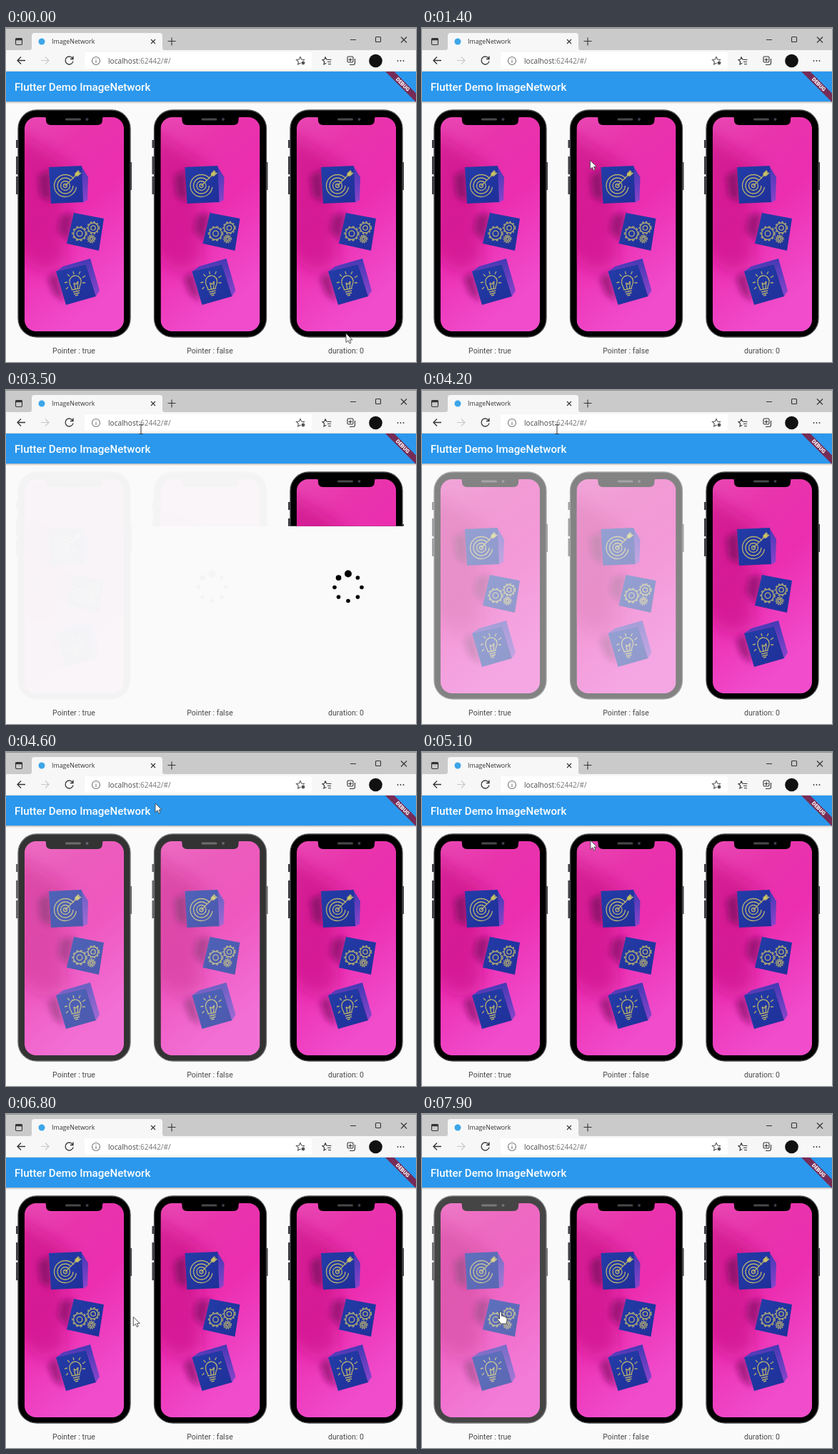
An HTML page for the animation above (8 s loop, 574 px wide and 468 px high).

```html
<!DOCTYPE html>
<html lang="en">
<head>
<meta charset="utf-8">
<title>ImageNetwork</title>
<style>
  html, body { margin: 0; width: 100%; height: 100%; overflow: hidden; background: #fdfdfd; }
  svg { display: block; }
  .ui { font-family: "Open Sans", sans-serif; }
  .app { font-family: Roboto, sans-serif; }
  .line { fill: none; stroke: #333; stroke-width: 1.1; }
  .gold { fill: none; stroke: #b3ae70; stroke-width: 1.3; }
</style>
</head>
<body>
<svg width="574" height="468" viewBox="0 0 574 468">
  <defs>
    <linearGradient id="pink" x1="0" y1="0" x2=".4" y2="1">
      <stop offset="0" stop-color="#ea48b4"/>
      <stop offset=".25" stop-color="#e835ac"/>
      <stop offset=".55" stop-color="#ec2db0"/>
      <stop offset="1" stop-color="#f04ccc"/>
    </linearGradient>
    <linearGradient id="face" x1="0" y1="0" x2="1" y2="1">
      <stop offset="0" stop-color="#233da8"/>
      <stop offset="1" stop-color="#1f2f98"/>
    </linearGradient>
    <linearGradient id="side" x1="0" y1="0" x2="0" y2="1">
      <stop offset="0" stop-color="#4339b4"/>
      <stop offset="1" stop-color="#8a45cc"/>
    </linearGradient>
    <linearGradient id="drop" x1="0" y1="0" x2="0" y2="1">
      <stop offset="0" stop-color="#000" stop-opacity=".28"/>
      <stop offset="1" stop-color="#000" stop-opacity="0"/>
    </linearGradient>
    <filter id="soft" x="-50%" y="-50%" width="200%" height="200%"><feGaussianBlur stdDeviation="4"/></filter>
    <filter id="haze" x="-50%" y="-50%" width="200%" height="200%"><feGaussianBlur stdDeviation="11"/></filter>
    <clipPath id="screen"><rect x="26" y="125" width="139" height="300" rx="16"/></clipPath>
    <clipPath id="page"><rect y="61" width="574" height="407"/></clipPath>
    <clipPath id="reveal"><rect id="loaded" y="110" width="200" height="330"/></clipPath>

    <g id="phone">
      <path d="M15.5 157v11m0 12v25m0 3v25M174.500 188v39" stroke="#3c3c40" stroke-width="3"/>
      <rect x="17" y="115" width="157" height="318" rx="26" fill="#000" stroke="#4a4c50" stroke-width="1.300"/>
      <g clip-path="url(#screen)">
        <rect x="26" y="125" width="139" height="300" fill="url(#pink)"/>
        <path d="M10 140L95 195 80 270 85 330 50 345 10 310z" fill="#c80a84" opacity=".6" filter="url(#haze)"/>
        <g filter="url(#soft)">
          <path d="M62 198L45 207 48 236 64 244z" fill="#7d0c62" opacity=".75"/>
          <path d="M96 259L76 262 72 284 88 300z" fill="#8c0c6c" opacity=".75"/>
          <path d="M72 341L58 350 66 372 82 384z" fill="#8c0c6c" opacity=".75"/>
        </g>
        <path d="M105 193L115 209 114 241 107 245z" fill="url(#side)"/>
        <path d="M60 195L106 193 108 244 63 246z" fill="url(#face)"/>
        <path d="M95 259L137 267 130 312 85 302z" fill="url(#face)"/>
        <path d="M70 341L80 334 118 323 131 368 126 376 112 331z" fill="url(#side)"/>
        <path d="M70 341L112 331 126 376 84 388z" fill="url(#face)"/>
        <g class="gold">
          <circle cx="83" cy="221" r="15.500" stroke-dasharray="84 14" stroke-dashoffset="-2"/>
          <circle cx="83" cy="221" r="11" stroke-dasharray="60 10"/>
          <circle cx="83" cy="221" r="6.500"/>
          <circle cx="83" cy="221" r="2.500"/>
          <path d="M83 221L103 201"/>
          <path d="M97 207v-3l4-4 .5 3 3 .5-4 3.500z" fill="#cfc75c"/>
          <g id="gears"></g>
          <path d="M92.500 367c0-4-4-6-3.500-11a8 8 0 0 1 16-2c1 5-3 7-2 11zM94 370l9-2m-8 5l8-2m-6 4l4-1M95 357l2 9m4-11l-1 10M95 357l3 2 3-4"/>
          <path d="M95 345l-1-4m-5 7l-3-3m0 11l-4 1m5 6l-3 3M102 345l2-4m3 9l4-3m-4 10l4 0"/>
        </g>
        <path d="M53 124h85q-3 0-3 4v1q0 7-7 7H63q-7 0-7-7v-1q0-4-3-4z"/>
      </g>
      <rect x="83" y="126.500" width="22" height="3" rx="1.500" fill="#48484c"/>
      <circle cx="113.500" cy="128" r="2" fill="#3a3d4a"/>
    </g>
  </defs>

  <!-- Browser -->
  <rect width="574" height="31" fill="#cacaca"/>
  <rect width="574" height="1" fill="#8f8f8f"/>
  <rect y="31" width="574" height="30" fill="#f7f7f7"/>
  <rect y="60" width="574" height="1" fill="#dedede"/>
  <path d="M33 31q3 0 3-3V11q0-4 4-4H215q4 0 4 4v17q0 3 3 3z" fill="#f7f7f7"/>
  <rect x="110" y="34" width="318" height="23" rx="3" fill="#fff"/>
  <rect id="hover" x="73" y="34" width="31" height="23" rx="2" fill="#d9d9d9"/>
  <circle cx="50" cy="19" r="4.500" fill="#3ea6e8"/>
  <g class="ui">
    <text id="title" x="64" y="22" font-size="8.8" fill="#333"></text>
    <text x="143" y="49.500" font-size="10.1" fill="#777"><tspan fill="#484848">localhost</tspan>:62442/#/</text>
  </g>
  <g class="line">
    <rect x="13.500" y="14.500" width="9" height="9" rx="1.500"/>
    <path d="M13 16h10" stroke-width="2.500"/>
    <path d="M203 16l6 6m0-6l-6 6M232 13.500v11M226.500 18.500h11"/>
    <path d="M482 16.500h8M553 12.500l8 8m0-8l-8 8"/>
    <rect x="517.500" y="12.500" width="7" height="7" rx="1"/>
    <path d="M27 45.500H16m5-5l-5 5 5 5" stroke-width="1.300"/>
    <path d="M49 45.500h11m-5-5l5 5-5 5" stroke="#c8c8c8"/>
    <path d="M93.500 43a5.500 5.500 0 1 0 .5 3.500M94 39.500v4h-4" stroke-width="1.300"/>
    <circle cx="126" cy="46" r="5.500" stroke="#777"/>
    <path d="M126 45v4m0-6.500v1" stroke="#777"/>
    <path d="M412 40.500l1.700 3.500 3.800.5-2.800 2.700.7 3.800-3.400-1.800-3.400 1.800.7-3.800-2.800-2.700 3.800-.5z" stroke="#555"/>
    <circle cx="416" cy="49" r="3" fill="#555" stroke="#fff"/>
    <path d="M447 40.500l1.600 3.500 3 .5M446 44l-3 .5 2.700 2.700-.7 3.800 3.300-1.800M446 44l1-3.500M450 44.500h5.500m-5.500 3h5m-4 3h4"/>
    <rect x="478" y="40" width="8" height="8" rx="1.500"/>
    <path d="M488.500 43v6q0 2.500-2.500 2.500h-5M482 42v5m-2.500-2.500h5"/>
  </g>
  <circle cx="517.500" cy="46" r="9.300" fill="#111"/>
  <path d="M548.500 46h8.500" stroke="#333" stroke-width="1.800" stroke-linecap="round" stroke-dasharray="0 4"/>

  <!-- Start-up page -->
  <g id="boot">
    <rect y="61" width="574" height="407" fill="#fdfdfd"/>
    <rect y="61" width="574" height="6" fill="#2abff5"/>
    <rect id="bar" y="61" height="6" fill="#1273c0"/>
  </g>

  <!-- App -->
  <g id="app" class="app" clip-path="url(#page)">
    <rect y="61" width="574" height="407" fill="#fafafa"/>
    <rect y="103" width="574" height="3" fill="url(#drop)"/>
    <rect y="61" width="574" height="42" fill="#2b98ed"/>
    <text x="12" y="88" font-size="15.1" font-weight="500" fill="#fff">Flutter Demo ImageNetwork</text>
    <path d="M531 61H543.500L574 91.500V104z" fill="#762c56"/>
    <text transform="translate(553.700 80.700) rotate(45)" text-anchor="middle" font-size="7.500" font-weight="900" fill="#fff">DEBUG</text>
    <g font-size="10.570" fill="#4a4a4a" text-anchor="middle">
      <text x="95" y="455.500">Pointer : true</text>
      <text x="285.500" y="455.500">Pointer : false</text>
      <text x="476" y="455.500">duration: 0</text>
    </g>
    <g id="slots"></g>
  </g>

  <g id="cursor" stroke-linejoin="round">
    <path id="arrow" d="M0 0V12.500L3 9.800 5 14 7 13 5 9H9z" fill="#fff" stroke="#444" stroke-width=".9"/>
    <path id="beam" d="M-2.500 -6.500H-.5L0 -6 .5 -6.500H2.500M0 -6V6M-2.500 6.500H-.5L0 6 .5 6.500H2.500" fill="none" stroke="#333" stroke-width="1"/>
    <path id="hand" d="M-1.500 9V1.500Q-1.500 0 0 0T1.500 1.500V6Q4 5 4.500 7 6.500 6 7 8 9 7.500 9 9.500V13Q8 15 8 17H0Q-1 14-4.500 10.500-4 8-1.500 10z" fill="#fff" stroke="#333" stroke-width=".9"/>
  </g>
</svg>
<script>
const LOOP = 8000;
const $ = id => document.getElementById(id);
const clamp = (v, lo = 0, hi = 1) => Math.min(hi, Math.max(lo, v));
const progress = (t, from, to) => clamp((t - from) / (to - from));
const smooth = p => (1 - Math.cos(Math.PI * p)) / 2;
const show = (el, on) => el.setAttribute("visibility", on ? "visible" : "hidden");

// time, x, y of the mouse pointer
const PATH = [
  [0, 476, 428], [400, 476, 428], [1000, 474, 410], [1700, 85, 44], [3050, 85, 44],
  [3450, 189, 55], [4250, 189, 55], [4600, 209, 72], [5000, 235, 120],
  [6000, 273, 282], [6300, 273, 282], [7200, 112, 286], [7900, 110, 277], [LOOP, 110, 277]
];

function pointerAt(t) {
  const i = PATH.findIndex(k => k[0] > t);
  const [a, b] = [PATH[i - 1], PATH[i]];
  const p = smooth(progress(t, a[0], b[0]));
  return [a[1] + (b[1] - a[1]) * p, a[2] + (b[2] - a[2]) * p];
}

$("gears").innerHTML = [[103, 288, 9.5], [122, 280, 8], [119.5, 295.5, 5]].map(([x, y, r]) => {
  const tooth = 2 * Math.PI * r / 20;
  return `<circle cx="${x}" cy="${y}" r="${r - 1}"/><circle cx="${x}" cy="${y}" r="${r * .4}"/>
    <circle cx="${x}" cy="${y}" r="${r + .5}" stroke-dasharray="${tooth}"/>`;
}).join("");

$("slots").innerHTML = [0, 1, 2].map(i => `<g transform="translate(${190.5 * i})">
  <g class="spinner">${"<circle/>".repeat(8)}</g>
  <use href="#phone" ${i ? 'clip-path="url(#reveal)"' : ""}/></g>`).join("");
const slots = [...$("slots").children];
const spinners = [...document.querySelectorAll(".spinner")];

function drawSpinner(spinner, t) {
  const head = (t - 2500) / 125;
  [...spinner.children].forEach((dot, i) => {
    const angle = i * Math.PI / 4;
    const behind = (((head - i) % 8) + 8) % 8;
    dot.setAttribute("cx", 98 + 19 * Math.sin(angle));
    dot.setAttribute("cy", 276.5 - 19 * Math.cos(angle));
    dot.setAttribute("r", 2.8 + 2.2 * Math.max(0, 1 - behind / 2));
  });
}

function draw(t) {
  const [x, y] = pointerAt(t);
  const inApp = t < 2400 || t >= 3100;
  const reloading = t >= 2400 && t < 3800;

  $("title").textContent = t >= 2050 && t < 3100 ? "example" : "ImageNetwork";
  show($("app"), inApp);
  show($("boot"), !inApp);
  $("bar").setAttribute("width", 172 + 258 * progress(t, 2400, 3000));

  const shown = reloading
    ? t < 3500 ? 80 * progress(t, 3300, 3500) : 80 + 250 * progress(t, 3500, 3800)
    : 330;
  $("loaded").setAttribute("height", shown);

  const fade = t < 2400 ? 1 : smooth(progress(t, 3320, 5150));
  const hovered = 1 - .28 * progress(t, 6800, 7100);
  [fade * hovered, fade, 1].forEach((o, i) => slots[i].setAttribute("opacity", o));
  spinners.forEach((s, i) => {
    const on = inApp && reloading && (i || t < 3400);
    s.setAttribute("display", on ? "inline" : "none");
    if (on) drawSpinner(s, t);
  });
  slots[0].lastElementChild.setAttribute("display", t >= 2400 && t < 3400 ? "none" : "inline");

  const inBar = y > 34 && y < 58;
  const overText = inBar && x > 120 && x < 400;
  const overPhone = inApp && x > 17 && x < 174 && y > 115 && y < 433;
  show($("hover"), inBar && x > 73 && x < 104);
  show($("beam"), overText);
  show($("hand"), overPhone);
  show($("arrow"), !overText && !overPhone);
  $("cursor").setAttribute("transform", `translate(${x} ${y})`);
}

function tick() {
  draw(performance.now() % LOOP);
  requestAnimationFrame(tick);
}
tick();
</script>
</body>
</html>
```
